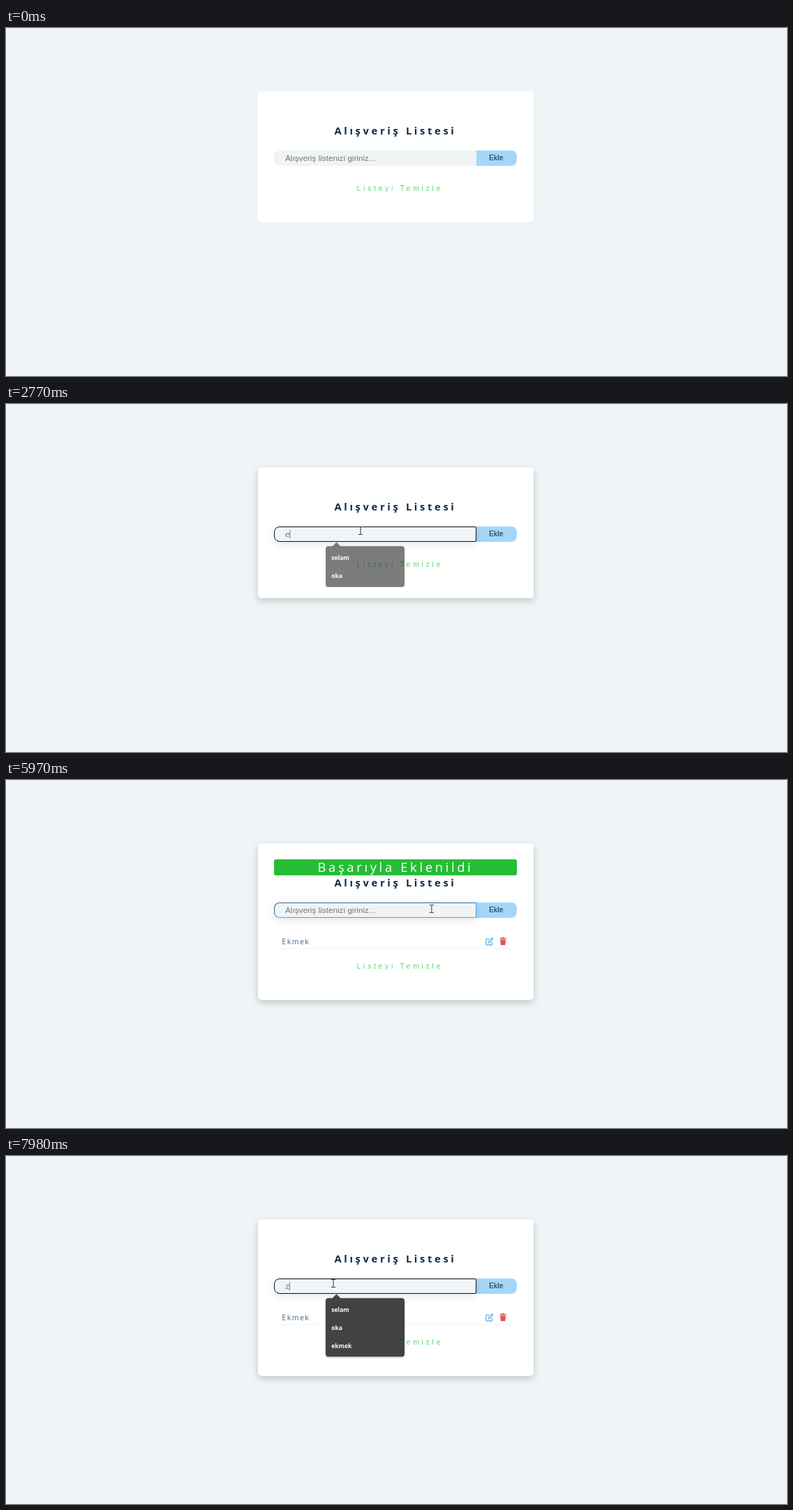
An HTML page for the animation above (8000 ms loop, 1119 by 500 pixels).

```html
<!DOCTYPE html>
<html lang="tr">
<head>
<meta charset="utf-8">
<title>Liste</title>
<style>
html, body { margin: 0; width: 100%; height: 100%; overflow: hidden; background: #eff4f7; }
div, svg { position: absolute; box-sizing: border-box; }
svg { left: 0; top: 0; }
#card { left: 361px; top: 91px; width: 394.5px; border-radius: 5px; background: #fff; }
#field { left: 384px; top: 176px; width: 289.5px; height: 22px; border: 1.5px solid transparent;
  border-radius: 8px 0 0 8px; background: #eff4f7; }
#field.hover { border-color: #2f719c #49a6e9 #49a6e9 #2f719c; }
#field.focus { border-color: #101010; border-radius: 8px 2px 2px 8px; }
#add { left: 673px; top: 176px; width: 59px; height: 22px; border-radius: 0 8px 8px 0; background: #a5d6f8; }
#alert { left: 384px; top: 114px; width: 348px; height: 23px; border-radius: 3px; background: #25bd35; }
text { white-space: pre; }
.open { font-family: "Open Sans", "Noto Sans", sans-serif; }
.arial { font-family: "Liberation Sans", Arial, sans-serif; }
.wide { letter-spacing: 3.67px; }
</style>
</head>
<body>
<div id="card"></div>
<div id="add"></div>
<div id="field"></div>
<div id="alert"></div>
<svg width="1119" height="500" viewBox="0 0 1119 500">
  <text id="notice" class="open wide" x="446.5" y="132" font-size="18.35" fill="#fff">Başarıyla Eklenildi</text>
  <text class="open wide" x="470.5" y="153.3" font-size="14.7" font-weight="700" fill="#102a42">Al&#305;s&#807;veriş Listesi</text>
  <text id="entry" class="arial" x="400" y="191" font-size="11.74"></text>
  <path id="caret" d="M0 181v12.5" stroke="#617d98"/>
  <text class="arial" x="692" y="190.3" font-size="10.57" fill="#102a42">Ekle</text>
  <g id="item">
    <path d="M384 242.5H732" stroke="#f3f4f5"/>
    <text class="open" x="395.3" y="236" font-size="10.57" letter-spacing="1.47" fill="#486480">Ekmek</text>
    <g fill="none" stroke="#63b5e8" stroke-width="1.3">
      <path d="M692.5 228.2H689q-1.2 0-1.2 1.2v6.4q0 1.2 1.2 1.2h6.2q1.2 0 1.2-1.2v-3"/>
      <path d="M691.2 233.8l.4-2.2 4.7-4.7 1.6 1.6-4.7 4.7z"/>
    </g>
    <path d="M707.5 227h2.7l.6-.9h2.6l.6.9h2.7v1.4h-9.2zM708.2 229.2h7.8l-.5 7q-.1 1-1.1 1h-4.6q-1 0-1.1-1z" fill="#e15858"/>
  </g>
  <text id="clear" class="arial wide" x="502.4" font-size="10.57" fill="#5fd670">Listeyi Temizle</text>
  <g id="popup">
    <path d="M467 205l6.5-6.5 6.5 6.5z" fill="#333"/>
    <rect id="menu" x="458" y="204.3" width="113" rx="4" fill="#333"/>
    <g class="open" font-size="8.5" font-weight="700" fill="#fff">
      <text x="466.3" y="223.5">selam</text>
      <text x="466.3" y="249.6">oka</text>
      <text id="third" x="466.3" y="275.7">ekmek</text>
    </g>
  </g>
  <g id="cursor">
    <circle id="spot" r="9" fill="#f2ee1c" fill-opacity=".75"/>
    <path id="beam" d="M-3-5.5h2.2l.8.6.8-.6H3M0-5v10M-3 5.5h2.2l.8-.6.8.6H3" fill="none" stroke="#333"/>
    <path id="arrow" d="M0 0v11l2.5-2.4 1.8 4 1.8-.8-1.8-3.8h3.5z" fill="#fff" stroke="#222" stroke-width=".9"/>
  </g>
</svg>
<script>
const $ = id => document.getElementById(id);
const show = (id, on) => { $(id).style.display = on ? '' : 'none'; };
const within = (t, a, b) => t >= a && t < b;
const clamp = v => Math.max(0, Math.min(1, v));
const hint = 'Al\u0131s\u0327veriş listenizi giriniz...';

// Pointer path: time, x, y
const path = [
  [200, 995, 455], [500, 800, 330], [700, 640, 215], [850, 530, 168], [1000, 508, 182],
  [4570, 508, 182], [4750, 620, 176], [4920, 717, 185.5], [5770, 717, 185.5],
  [5960, 610, 185], [6040, 609, 186], [6370, 560, 220], [6440, 545, 245], [6580, 505, 270],
  [6740, 474, 205], [6860, 470, 183], [7180, 469, 183], [8000, 469, 183]
];
// Typed text: time, value
const typed = [[1330, ''], [2710, 'e'], [2840, 'ek'], [3320, 'ekm'], [3450, 'ekme'], [3580, 'ekmek'],
  [5720, ''], [6900, ''], [7980, 'z']];
const clicks = [[1330, 1460], [5570, 5720], [6900, 7040]];

function pointer(t) {
  const i = Math.max(1, path.findIndex(p => p[0] > t));
  const [a, b] = [path[i - 1], path[i]];
  const k = clamp((t - a[0]) / (b[0] - a[0]));
  return [a[1] + (b[1] - a[1]) * k, a[2] + (b[2] - a[2]) * k];
}

function draw(t) {
  const added = t >= 5720;
  const focused = within(t, 1330, 5570) || t >= 6900;
  const tick = t < 1000 ? 200 + Math.floor((t - 200) / 64) * 64 : t;
  const [x, y] = pointer(tick);
  const overField = t >= 200 && x > 384 && x < 673 && y > 176 && y < 198;

  $('card').style.height = (added ? 225 : 188) + 'px';
  $('card').style.boxShadow = `0 3.7px 11px rgba(0,0,0,${0.2 * clamp((t - 660) / 300)})`;
  $('field').className = focused ? 'focus' : overField ? 'hover' : '';
  $('field').style.boxShadow = overField ? '0 3.7px 11px rgba(0,0,0,.1)' : 'none';
  $('clear').setAttribute('y', added ? 271.2 : 234.3);
  show('item', added);
  for (const id of ['alert', 'notice']) show(id, within(t, 5720, 7720));

  const [since, value] = typed.filter(e => e[0] <= t).pop() || [0, ''];
  const entry = $('entry');
  entry.textContent = value || hint;
  entry.setAttribute('fill', value ? '#617d98' : '#757575');
  const end = value ? entry.getComputedTextLength() : 0;
  $('caret').setAttribute('transform', `translate(${400.4 + end})`);
  show('caret', focused && (t - since) % 1060 < 530);

  const late = t >= 7980;
  show('popup', late || within(t, 2710, 3040));
  show('third', late);
  $('menu').setAttribute('height', late ? 84 : 58.7);
  const fade = late || t < 2770 ? 0.92 : t < 2840 ? 0.64 : t < 2910 ? 0.36 : 0.12;
  $('popup').setAttribute('opacity', fade);
  $('popup').style.filter = late ? 'drop-shadow(0 1.5px 1.5px rgba(0,0,0,.35))' : '';

  show('cursor', t >= 200);
  $('cursor').setAttribute('transform', `translate(${x} ${y})`);
  show('spot', clicks.some(c => within(t, ...c)));
  show('beam', overField);
  show('arrow', !overField);
}

function frame() {
  draw(performance.now() % 8000);
  requestAnimationFrame(frame);
}
frame();
</script>
</body>
</html>
```
